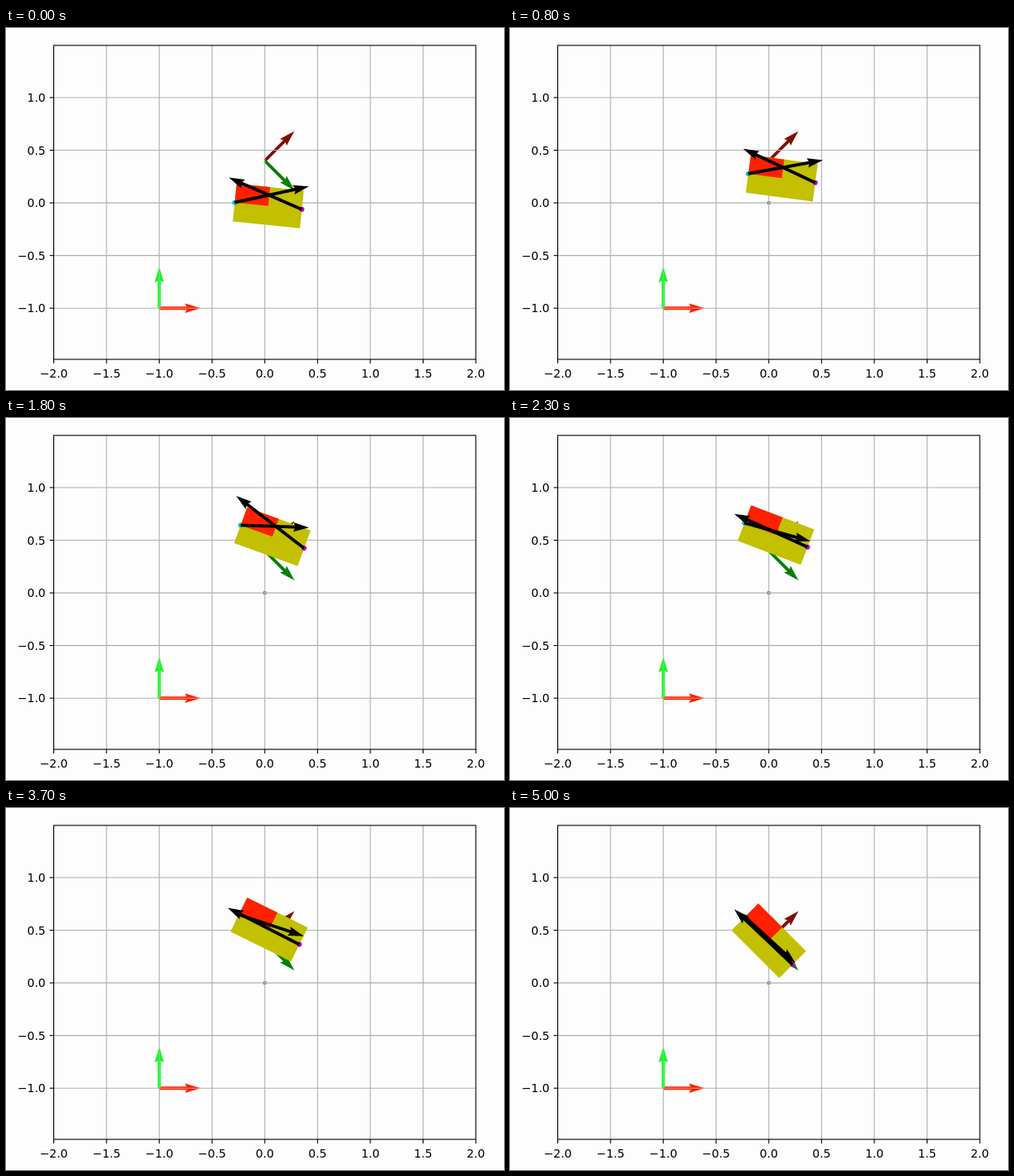
An HTML page with a canvas for the animation above (5.1 s loop, 600x437 px).

```html
<!DOCTYPE html>
<html>
<head>
<meta charset="utf-8">
<style>
html, body { margin: 0; overflow: hidden; background: #fdfdfe; }
canvas { display: block; }
</style>
</head>
<body>
<canvas id="stage" width="600" height="437"></canvas>
<script>
const ctx = document.getElementById('stage').getContext('2d');
const STEP = 100, LOOP = 5100;
const UNIT = 127.13, LEFT = 57.5, RIGHT = 566, TOP = 21, BOTTOM = 400;
const HALF_W = 0.32 * UNIT, HALF_H = 0.18 * UNIT;
const GRID = '#b0b0b0', INK = '#000';
const px = x => 311.8 + x * UNIT;
const py = y => 211.1 - y * UNIT;
const mix = (a, b, k) => a + (b - a) * k;
const progress = (t, from, to) => Math.min(1, Math.max(0, (t - from) / (to - from)));

// Waypoints of the pushed box, in plot units and degrees
const PATH = [
  { step: 0, x: 0.033, y: -0.029, tilt: 5.8 },
  { step: 8, x: 0.123, y: 0.234, tilt: 7.6 },
  { step: 12, x: 0.131, y: 0.364, tilt: 9 },
  { step: 13, x: 0.159, y: 0.4, tilt: 19.7 },
  { step: 18, x: 0.072, y: 0.533, tilt: 20 },
  { step: 23, x: 0.068, y: 0.549, tilt: 20.9 },
  { step: 37, x: 0.041, y: 0.506, tilt: 26.2 },
  { step: 50, x: 0, y: 0.4, tilt: 45 }
];

function poseAt(step) {
  const i = Math.max(1, PATH.findIndex(p => p.step >= step));
  const a = PATH[i - 1], b = PATH[i];
  const k = progress(step, a.step, b.step);
  return { x: mix(a.x, b.x, k), y: mix(a.y, b.y, k), tilt: mix(a.tilt, b.tilt, k) };
}

// Both forces lean upwards while lifting, then squeeze along the box
function forcesAt(step) {
  const turned = step >= 13;
  const settle = progress(step, 18, 23), s = progress(step, 23, 50);
  return {
    left: { length: turned ? 82.5 : 91.5, lean: mix(18, 5.5 + 4 * Math.sin(Math.PI * s) - 3 * s, settle) },
    right: { length: turned ? mix(103.5, 97, settle) : 96, lean: mix(17.7, 3.5 - 5 * s, settle) }
  };
}

function line(x1, y1, x2, y2, color) {
  ctx.strokeStyle = color;
  ctx.lineWidth = 1.1;
  ctx.beginPath();
  ctx.moveTo(x1, y1);
  ctx.lineTo(x2, y2);
  ctx.stroke();
}

function arrow(x, y, degrees, length, color) {
  const h = 1.9, neck = length - 9 * h, barb = length - 10 * h;
  ctx.save();
  ctx.translate(x, y);
  ctx.rotate(degrees * Math.PI / 180);
  ctx.fillStyle = color;
  ctx.beginPath();
  ctx.moveTo(0, -h);
  ctx.lineTo(neck, -h);
  ctx.lineTo(barb, -3 * h);
  ctx.lineTo(length, 0);
  ctx.lineTo(barb, 3 * h);
  ctx.lineTo(neck, h);
  ctx.lineTo(0, h);
  ctx.fill();
  ctx.restore();
}

function dot(x, y, color) {
  ctx.fillStyle = color;
  ctx.beginPath();
  ctx.arc(x, y, 3, 0, 7);
  ctx.fill();
}

function label(v, x, y, align) {
  ctx.fillStyle = INK;
  ctx.font = '13.9px "DejaVu Sans", sans-serif';
  ctx.textAlign = align;
  ctx.fillText(v.toFixed(1).replace('-', '\u2212'), x, y);
}

function drawFrames() {
  arrow(px(-1), py(-1), 0, 50, '#ff2000');
  arrow(px(-1), py(-1), -90, 50, '#20f030');
  arrow(px(0), py(0.4), -45, 50.5, '#801000');
  arrow(px(0), py(0.4), 45, 50.5, '#008000');
  ctx.lineWidth = 1;
  ctx.strokeStyle = '#555';
  ctx.strokeRect(px(0) - 1.3, py(0) - 1.3, 2.6, 2.6);
}

function drawAxes() {
  // Grid lines keep the hue of the arrows they cross
  ctx.globalCompositeOperation = 'luminosity';
  for (let v = -1.5; v <= 1.5; v += 0.5) {
    line(px(v), TOP, px(v), BOTTOM, GRID);
    if (Math.abs(v) <= 1) line(LEFT, py(v), RIGHT, py(v), GRID);
  }
  ctx.globalCompositeOperation = 'source-over';

  for (let v = -2; v <= 2; v += 0.5) {
    line(px(v), BOTTOM, px(v), BOTTOM + 4.9, INK);
    label(v, px(v), 421.8, 'center');
    if (Math.abs(v) > 1) continue;
    line(LEFT - 4.9, py(v), LEFT, py(v), INK);
    label(v, 47.7, py(v) + 5.2, 'right');
  }
  ctx.strokeStyle = INK;
  ctx.strokeRect(LEFT, TOP, RIGHT - LEFT, BOTTOM - TOP);
}

function drawBox(pose, { left, right }) {
  ctx.save();
  ctx.translate(px(pose.x), py(pose.y));
  ctx.rotate(pose.tilt * Math.PI / 180);
  ctx.fillStyle = '#c2c000';
  ctx.fillRect(-HALF_W, -HALF_H, 2 * HALF_W, 2 * HALF_H);
  ctx.fillStyle = '#ff2000';
  ctx.fillRect(-HALF_W, -HALF_H, HALF_W, HALF_H);
  dot(-HALF_W, 0, '#00bfbf');
  dot(HALF_W, 0, '#bf00bf');
  arrow(-HALF_W, 0, -left.lean, left.length, INK);
  arrow(HALF_W, 0, 180 + right.lean, right.length, INK);
  ctx.restore();
}

function render() {
  const step = Math.floor(performance.now() % LOOP / STEP);
  ctx.fillStyle = '#fdfdfe';
  ctx.fillRect(0, 0, 600, 437);
  drawFrames();
  drawAxes();
  drawBox(poseAt(step), forcesAt(step));
  requestAnimationFrame(render);
}
render();
</script>
</body>
</html>
```
